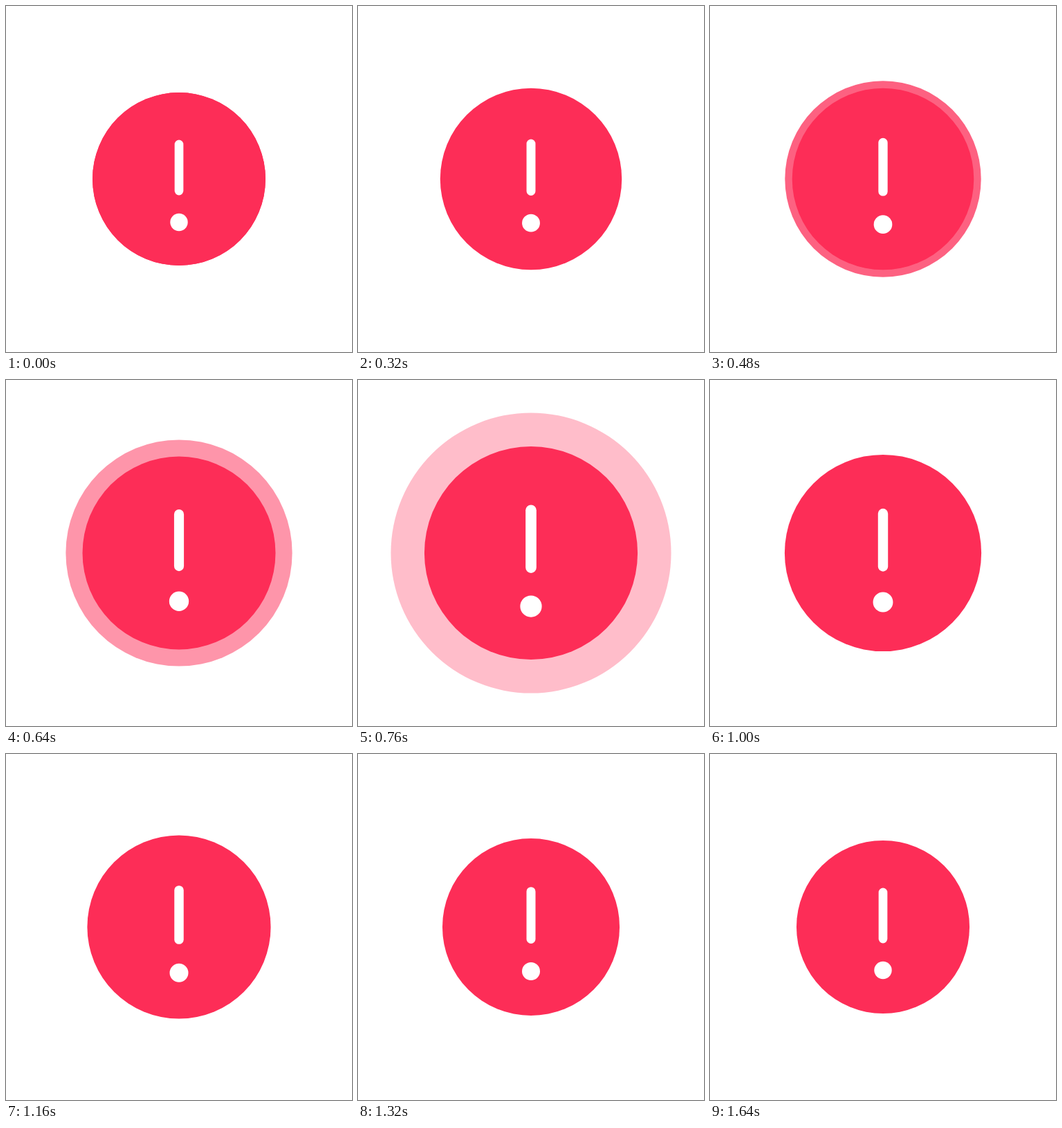
Animation of 500 by 500 pixels, one loop 1680 ms. Source, as an HTML page with a canvas:

```html
<!DOCTYPE html>
<html lang="en">
<head>
<meta charset="utf-8">
<title>Alert pulse</title>
<style>
  html, body { margin: 0; width: 100%; height: 100%; overflow: hidden; background: #fff; }
  canvas { display: block; width: 500px; height: 500px; }
</style>
</head>
<body>
<canvas id="stage" width="500" height="500"></canvas>
<script>
const ctx = document.getElementById('stage').getContext('2d');
const LOOP = 1680, STEP = 40, PEAK = 840;
const RED = '#fd2d57', WHITE = '#fff';
const RADIUS = 125;

const clamp = v => Math.min(1, Math.max(0, v));

// Cubic Bezier easing with handles (x1, 0) and (x2, 1), solved by bisection.
function bezier(x1, x2) {
  return x => {
    let lo = 0, hi = 1;
    for (let i = 0; i < 40; i++) {
      const s = (lo + hi) / 2, r = 1 - s;
      if (3 * x1 * s * r * r + 3 * x2 * s * s * r + s ** 3 < x) lo = s;
      else hi = s;
    }
    return lo * lo * (3 - 2 * lo);
  };
}

const swell = bezier(1, 0.85);
const settle = bezier(0.12, 0);

function disc(x, y, radius, color) {
  ctx.fillStyle = color;
  ctx.beginPath();
  ctx.arc(x, y, radius, 0, Math.PI * 2);
  ctx.fill();
}

function drawRing(grow, alpha) {
  if (alpha <= 0) return;
  ctx.globalAlpha = alpha;
  disc(0, 0, RADIUS * (1 + 0.8 * grow), RED);
  ctx.globalAlpha = 1;
}

function drawBadge(scale) {
  ctx.save();
  ctx.scale(scale, scale);
  disc(0, 0, RADIUS, RED);
  ctx.strokeStyle = WHITE;
  ctx.lineWidth = 12.7;
  ctx.lineCap = 'round';
  ctx.beginPath();
  ctx.moveTo(0, -50.1);
  ctx.lineTo(0, 17.1);
  ctx.stroke();
  disc(0, 62.5, 12.7, WHITE);
  ctx.restore();
}

function render(now) {
  const t = Math.floor((now % LOOP) / STEP) * STEP;
  const rise = t < PEAK ? swell(t / PEAK) : 1;
  const pulse = t < PEAK ? rise : 1 - settle((t - PEAK) / (LOOP - PEAK));

  ctx.setTransform(1, 0, 0, 1, 0, 0);
  ctx.fillStyle = WHITE;
  ctx.fillRect(0, 0, 500, 500);
  ctx.translate(250, 250);
  drawRing(rise, clamp(1 - (t - 320) / 640));
  drawBadge(1 + 0.3 * pulse);
}

function tick() {
  render(performance.now());
  requestAnimationFrame(tick);
}
tick();
</script>
</body>
</html>
```
